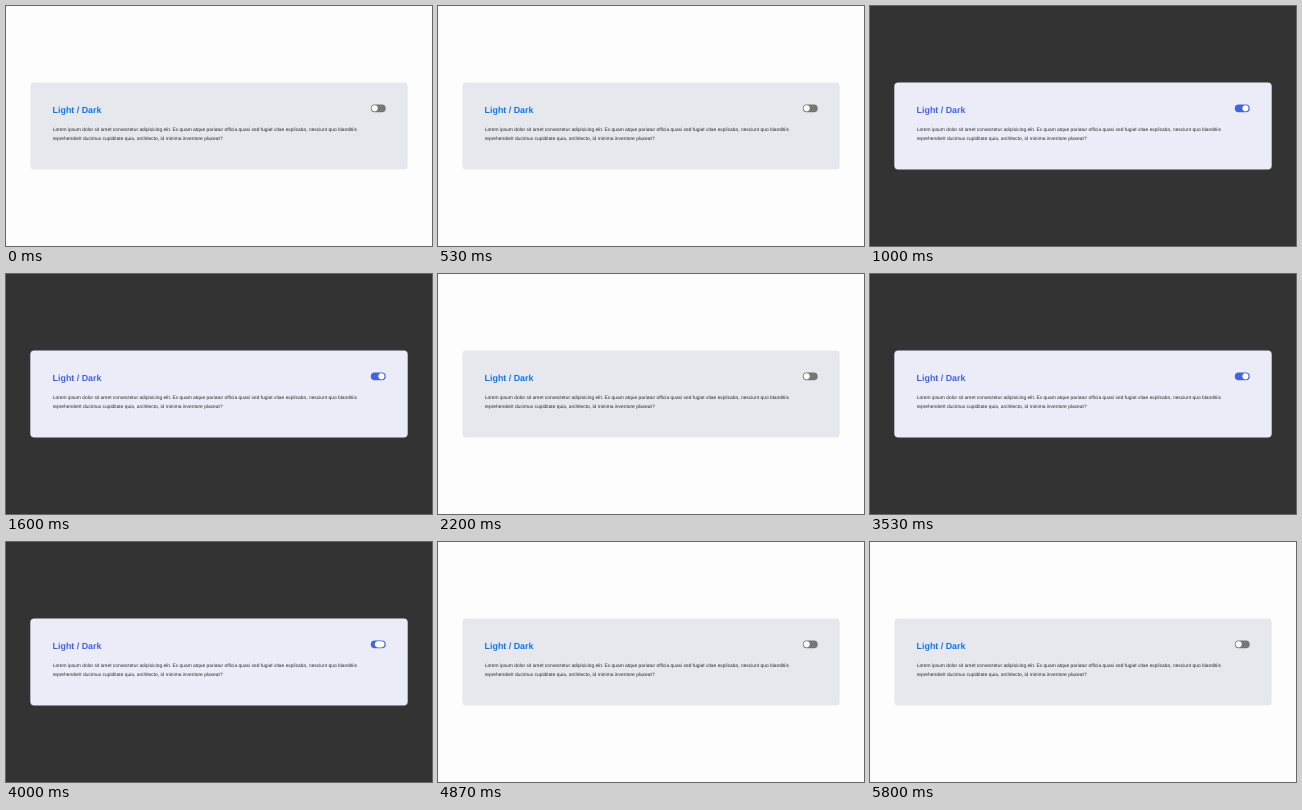
An HTML page that plays this animation: 426 px wide and 240 px high, repeating every 5.87 s.

```html
<!DOCTYPE html>
<html lang="en">
<head>
<meta charset="utf-8">
<title>Light / Dark</title>
<style>
  html, body { margin: 0; width: 100%; height: 100%; overflow: hidden; }
  svg {
    display: block; width: 100vw; height: 100vh;
    font-family: "Liberation Sans", Arial, sans-serif;
    text-rendering: geometricPrecision;
    --page: #fdfdfe; --card: #e7e7ee; --title: #1277e6; --track: #757575;
    background: var(--page);
  }
  svg.dark { --page: #333; --card: #ececf8; --title: #4361e4; --track: #4165dc; }
  .card { fill: var(--card); }
  .title { fill: var(--title); font-size: 8.9px; font-weight: bold; }
  .track { fill: var(--track); }
  .copy { fill: #2a2a2a; font-size: 4.88px; }
</style>
</head>
<body>
<svg viewBox="0 0 426 240">
  <rect class="card" x="24.3" y="76.4" width="377.4" height="87.2" rx="4"/>
  <text class="title" x="46.6" y="107">Light / Dark</text>
  <rect class="track" x="364.8" y="98.6" width="14.9" height="7.6" rx="3.8"/>
  <rect id="knob" y="99.3" height="6.1" rx="3.05" fill="#fff"/>
  <text class="copy" x="46.7" y="125">Lorem ipsum dolor sit amet consectetur adipisicing elit. Ex quam atque pariatur officia quasi sed fugiat vitae explicabo, nesciunt quo blanditiis</text>
  <text class="copy" x="46.7" y="133.8">reprehenderit ducimus cupiditate quia, architecto, id minima inventore placeat?</text>
</svg>
<script>
const LOOP = 5870, PRESS = 140, SLIDE = 180;
const LEFT = 365.6, RIGHT = 378.5, SIZE = 6.1, STRETCH = 4.3;
const toggles = [740, 1970, 3170, 4090];
const svg = document.querySelector("svg");
const knob = document.getElementById("knob");

// Smooth 0 to 1 over the given span
function ease(t, start, span) {
  const p = Math.min(1, Math.max(0, (t - start) / span));
  return p * p * (3 - 2 * p);
}

function draw(now) {
  const t = now % LOOP;
  let on = 0, press = 0;
  toggles.forEach((at, i) => {
    on += (i % 2 ? -1 : 1) * ease(t, at, SLIDE);
    press += ease(t, at - PRESS, PRESS / 2) - ease(t, at, SLIDE);
  });
  const width = SIZE + STRETCH * press;
  knob.setAttribute("width", width);
  knob.setAttribute("x", LEFT + on * (RIGHT - LEFT - width));
  svg.classList.toggle("dark", toggles.filter(at => t >= at).length % 2 === 1);
  requestAnimationFrame(() => draw(performance.now()));
}
draw(0);
</script>
</body>
</html>
```
